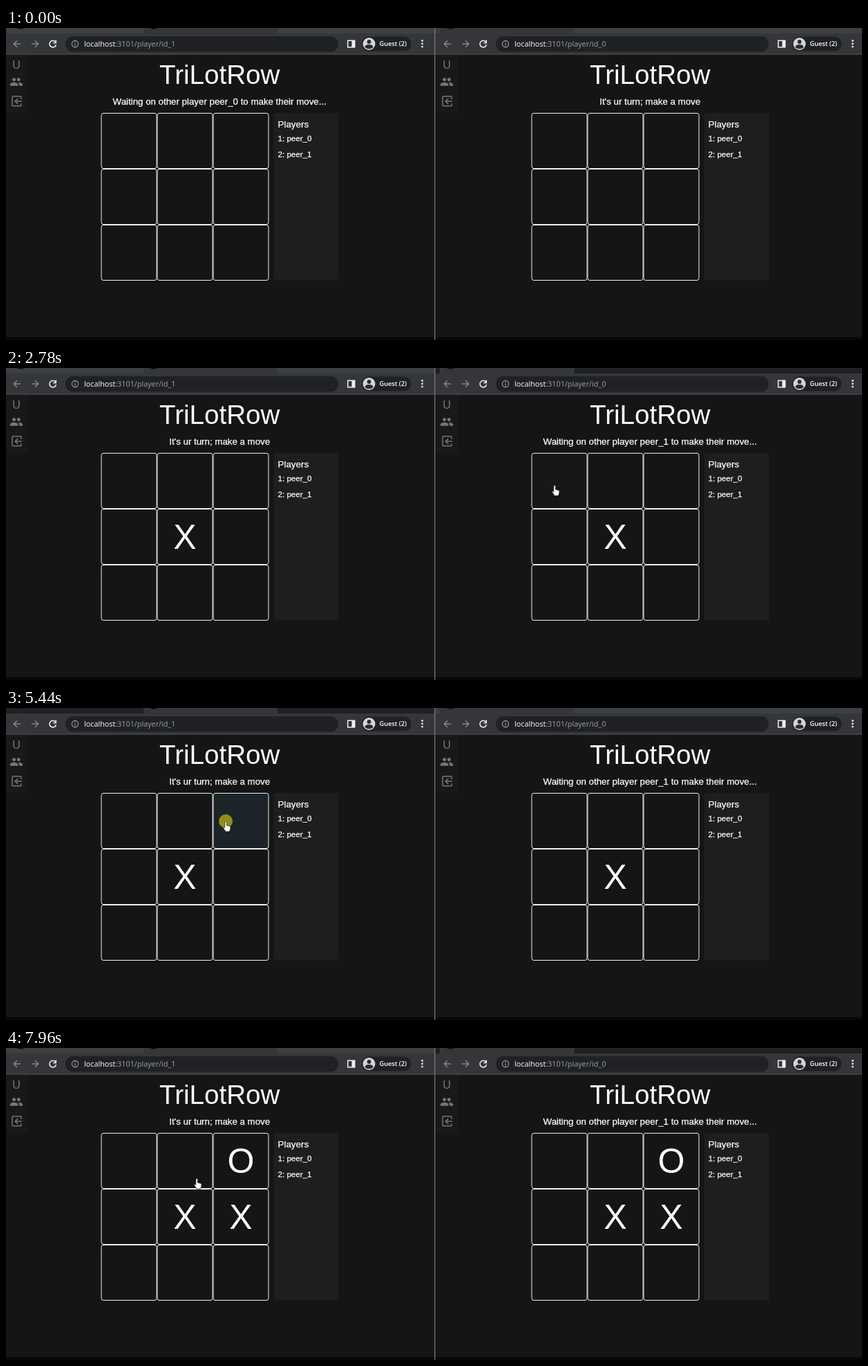
An HTML page that plays this animation: 1239x452 px, repeating every 8 s.

```html
<!DOCTYPE html>
<html lang="en">
<head>
<meta charset="utf-8">
<title>Two player board</title>
<style>
  html, body { margin: 0; height: 100%; overflow: hidden; background: #151515; }
  svg { display: block; width: 100vw; height: 100vh; }
  text { font-family: "Liberation Sans", Arial, sans-serif; fill: #fff; }
  .chrome { font-family: "Open Sans", sans-serif; }
  .mid { text-anchor: middle; }
  .small { stroke: #fff; stroke-width: .25; }
  .line { fill: none; stroke-width: 1.5; }
</style>
</head>
<body>
<svg id="stage" viewBox="0 0 1239 452"></svg>
<script>
const LOOP = 8000, STEP = 66.3, FADE = 280;
const PANE_X = [0, 623], CELL = 81, BOARD_X = 137.5, BOARD_Y = 123;
const PLAYERS = ['peer_0', 'peer_1'];

// Each stroke is an eased Bezier curve that starts where the last one ended
const ENTRY = [1163, 402];
const STROKES = [
  { from: 390, to: 520, via: [[1037, 318]] },
  { from: 653, to: 1460, via: [[690, 230], [868, 139], [868, 139]] },
  { from: 1500, to: 2190, via: [[690, 200], [940, 320], [880, 240]] },
  { from: 2520, to: 3110, via: [[767, 102], [709, 226]] },
  { from: 3400, to: 4240, via: [[329, 415], [328, 272]] },
  { from: 4280, to: 5100, via: [[170, 240], [220, 100], [318, 164]] },
  { from: 5570, to: 5960, via: [[800, 197]] },
  { from: 5990, to: 6820, via: [[996, 365], [951, 237]] },
  { from: 7520, to: 7955, via: [[620, 310], [276, 189]] }
];
// The pressed pane takes focus at once; the mark appears after the release
const MOVES = [
  { press: 2330, release: 2500, place: 2520, pane: 1, cell: 4, mark: 'X' },
  { press: 5170, release: 5540, place: 5570, pane: 0, cell: 2, mark: 'O' },
  { press: 6890, release: 7410, place: 7550, pane: 1, cell: 5, mark: 'X' }
];

const range = n => [...Array(n).keys()];
const cellX = i => BOARD_X + CELL * (i % 3);
const cellY = i => BOARD_Y + CELL * Math.floor(i / 3);

function pane(p) {
  const cells = range(9).map(i => `
    <rect id="cell${p}${i}" x="${cellX(i) + .5}" y="${cellY(i) + .5}" width="80" height="80" rx="3" stroke="#f0f0f0"/>
    <text id="mark${p}${i}" class="mid" x="${cellX(i) + 40.5}" y="${cellY(i) + 58}" font-size="50"></text>`).join('');
  const names = PLAYERS.map((name, i) =>
    `<text class="small" x="393.5" y="${163.5 + 23 * i}" font-size="11.6">${i + 1}: ${name}</text>`).join('');
  const dots = range(3).map(i => `<circle cx="602.5" cy="${18.5 + 4.3 * i}" r="1.4" fill="#eee"/>`).join('');
  return `<g transform="translate(${PANE_X[p]})">
    <rect x="-2" y="8" width="622" height="30" fill="#35363a"/>
    <rect x="-2" y="37.5" width="622" height="1.2" fill="#4b4c4f"/>
    <g class="line" stroke="#85878a">
      <path d="M21 23H11.5m4.5-4.7L11.3 23l4.7 4.7M37 23h9.5m-4.5-4.7l4.7 4.7l-4.7 4.7"/>
      <path d="M71.5 20a4.8 4.8 0 1 0 1 4M72.3 17.5v4h-4" stroke="#f1f1f1"/>
    </g>
    <rect x="86" y="12" width="395" height="22.5" rx="11.2" fill="#202124"/>
    <g class="line" stroke="#a2a6ab" style="stroke-width:1.1"><circle cx="100" cy="23" r="4.6"/><path d="M100 22.3v3.2M100 20v1.2"/></g>
    <text class="chrome" x="113" y="27" font-size="10.8">localhost<tspan fill="#9aa0a6">:3101/player/id_${1 - p}</tspan></text>
    <rect x="494.7" y="18.2" width="10" height="9.6" class="line" stroke="#f1f1f1"/>
    <rect x="500.5" y="18" width="4.5" height="10" fill="#f1f1f1"/>
    <rect x="515" y="12.5" width="71.5" height="21" rx="10.5" fill="#202124"/>
    <circle cx="525.5" cy="23" r="9" fill="#d4d6d9"/>
    <circle cx="525.5" cy="20" r="2.9" fill="#2b2c30"/>
    <path d="M519.5 28q0-4 6-4t6 4q-2.5 2.3-6 2.3t-6-2.3" fill="#2b2c30"/>
    <text class="chrome" x="540.5" y="26.2" font-size="9.2" font-weight="600">Guest (2)</text>
    ${dots}
    <rect y="39" width="32" height="83.5" fill="#191919"/>
    <text class="mid" x="15" y="59" font-size="16" style="fill:#777">U</text>
    <path transform="translate(5 68) scale(.83)" fill="#777" d="M16 11a3 3 0 1 0 0-6a3 3 0 0 0 0 6zM8 11a3 3 0 1 0 0-6a3 3 0 0 0 0 6zM8 13c-2.3 0-7 1.2-7 3.5V19h14v-2.5c0-2.3-4.7-3.5-7-3.5zM16 13l-1 .05c1.2.8 2 2 2 3.45V19h6v-2.5c0-2.3-4.7-3.5-7-3.5z"/>
    <path class="line" stroke="#777" d="M22 103v-2.5q0-1.5-1.5-1.5h-10q-1.5 0-1.5 1.5v11q0 1.5 1.5 1.5h10q1.5 0 1.5-1.5V109.5M23 106.2H13.2m4-4l-4 4l4 4"/>
    <text class="mid" x="309.2" y="81" font-size="38.6">TriLotRow</text>
    <text class="mid small" id="status${p}" x="309.2" y="111" font-size="13.3"></text>
    ${cells}
    <rect x="387.5" y="123" width="94" height="242.5" rx="3" fill="#1e1e1e"/>
    <text class="small" x="393.5" y="143.5" font-size="13.4">Players</text>
    ${names}
  </g>`;
}

const tabIcons = [15, 208, 637].map(x => `M${x} 0h12q-2 1.8-6 1.8t-6-1.8`).join('');
stage.innerHTML = `
  <rect width="1239" height="452" fill="#151515"/>
  <rect id="frame0" width="620" height="8"/>
  <rect id="frame1" x="621" width="618" height="8"/>
  <path d="M199 8V0H393V8zM628 8V0H823V8z" fill="#35363a"/>
  <path d="${tabIcons}" fill="#111"/>
  ${pane(0)}${pane(1)}
  <rect y="448" width="1239" height="4" fill="#0c0608"/>
  <rect x="620" width="1.3" height="452" fill="#777"/>
  <g id="cursor">
    <circle id="press" r="10" fill="#918f16"/>
    <g fill="#fff" stroke="#111" stroke-width=".7">
      <path id="hand" d="M-1.2 1.2a1.3 1.3 0 0 1 2.6 0V6l4.6 1.2q1.3.4 1.1 1.8l-.7 3.5l-1 2.5H-.2L-3.4 9.8q-.8-1.4.6-1.6l1.6 1.2z"/>
      <path id="arrow" d="M0 0V11L2.6 8.8L4.4 12.6L6.2 11.8L4.5 8H8z"/>
    </g>
  </g>`;

const el = id => document.getElementById(id);
const show = (id, on) => el(id).style.display = on ? '' : 'none';
const ease = u => u * u * (3 - 2 * u);
const mix = (a, b, u) => a.map((v, i) => v + (b[i] - v) * u);

function bezier(points, u) {
  while (points.length > 1)
    points = points.slice(1).map((point, i) => mix(points[i], point, u));
  return points[0];
}

function cursorAt(t) {
  const n = STROKES.findLastIndex(s => t >= s.from);
  if (n < 0) return null;
  const { from, to, via } = STROKES[n];
  const start = n ? STROKES[n - 1].via.at(-1) : ENTRY;
  return bezier([start, ...via], ease(Math.min(1, (t - from) / (to - from))));
}

const markAt = (cell, t) => MOVES.find(m => m.cell === cell && t >= m.place)?.mark || '';

// Key of the free cell under the cursor, as pane and cell digits
function hoverAt(t) {
  const pos = cursorAt(t);
  if (!pos) return '';
  const p = pos[0] > 621 ? 1 : 0;
  const col = Math.floor((pos[0] - PANE_X[p] - BOARD_X) / CELL);
  const row = Math.floor((pos[1] - BOARD_Y) / CELL);
  if (col < 0 || col > 2 || row < 0 || row > 2) return '';
  const cell = row * 3 + col;
  return markAt(cell, t) ? '' : `${p}${cell}`;
}

// Hover tint grows and fades by replaying the recent cursor history
function hoverLevels(t) {
  const levels = {}, dt = 10;
  for (let s = Math.max(0, t - 3 * FADE); s <= t; s += dt) {
    const over = hoverAt(s);
    if (over) levels[over] = levels[over] || 0;
    for (const key in levels)
      levels[key] = Math.min(1, Math.max(0, levels[key] + (key === over ? dt : -dt) / FADE));
  }
  return levels;
}

function draw(t) {
  const turn = MOVES.filter(m => t >= m.place).length % 2;
  const lastMove = MOVES.findLast(m => t >= m.press);
  const levels = hoverLevels(t);
  for (const p of [0, 1]) {
    el('frame' + p).setAttribute('fill', lastMove?.pane === p ? '#202124' : '#3c4043');
    el('status' + p).textContent = p !== turn ? "It's ur turn; make a move"
      : `Waiting on other player ${PLAYERS[turn]} to make their move...`;
    for (const i of range(9)) {
      const mark = markAt(i, t), tint = mark ? 0 : (levels[`${p}${i}`] || 0) ** 2;
      el(`cell${p}${i}`).setAttribute('fill', `rgb(${mix([21, 21, 21], [29, 36, 41], tint)})`);
      el(`mark${p}${i}`).textContent = mark;
    }
  }
  const pos = cursorAt(t), over = hoverAt(t);
  show('cursor', pos);
  show('hand', over);
  show('arrow', !over);
  show('press', lastMove && t < lastMove.release);
  if (pos) el('cursor').setAttribute('transform', `translate(${pos.map(Math.round)})`);
}

function tick() {
  const t = performance.now() % LOOP;
  draw(Math.floor((t + 16) / STEP) * STEP);
  requestAnimationFrame(tick);
}
tick();
</script>
</body>
</html>
```
